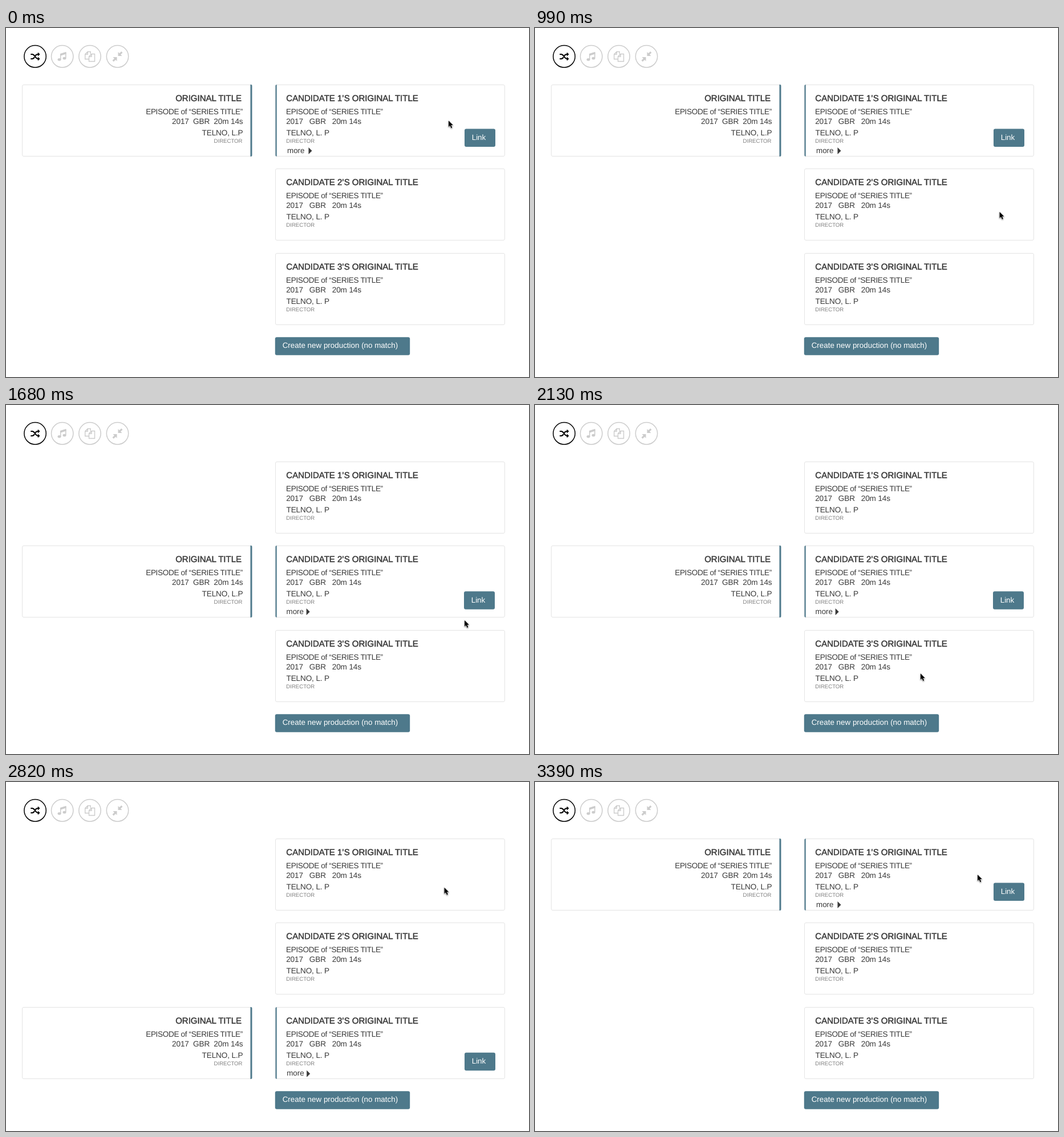
An HTML page for the animation above (3.45 s loop, 917 by 611 pixels).

```html
<!DOCTYPE html>
<html lang="en">
<head>
<meta charset="utf-8">
<title>Candidate matching</title>
<style>
  html, body { margin: 0; width: 100%; height: 100%; overflow: hidden; background: #fff; }
  svg { display: block; width: 917px; height: 611px; }
  text { font: 13.6px "Liberation Sans", Arial, sans-serif; letter-spacing: -.14px; fill: #3a3a3a; white-space: pre; text-rendering: geometricPrecision; }
  .title { font-size: 15px; letter-spacing: 0; stroke: #3a3a3a; stroke-width: .5px; }
  .episode { letter-spacing: -.36px; }
  .role { font-size: 9.6px; letter-spacing: 0; fill: #808080; }
  .label { font-size: 13.4px; letter-spacing: 0; }
  .action { fill: #fff; }
  .end text { text-anchor: end; }
  .box { fill: #fff; stroke: #e4e4e4; }
  .accent { fill: #4e798b; }
  .ring { fill: none; stroke-width: 1.5; }
  .line { fill: none; stroke: currentColor; }
  #cursor path { stroke: #fff; paint-order: stroke; filter: drop-shadow(0 1px 1px rgba(0, 0, 0, .5)); }
</style>
</head>
<body>
<svg viewBox="0 0 917 611">
  <g id="tools">
    <g color="#000">
      <path class="line" stroke-width="2.2" d="M43.300 46h2.500c5 0 5.500 8 10.500 8h.5M43.300 54h2.500c2 0 3.200-1.300 4.200-3M51.500 48.600c1-1.600 2.200-2.600 4.500-2.600h.8"/>
      <path fill="currentColor" d="M55.800 42.500l3.800 3.500-3.800 3.500zM55.800 50.500l3.800 3.500-3.800 3.500z"/>
    </g>
    <g color="#ccc" fill="currentColor">
      <path d="M95 45l10.500-3.200v3.800L95 48.800z"/>
      <path class="line" stroke-width="1.500" d="M95.700 46v9M104.800 43v9.500"/>
      <ellipse cx="93.500" cy="55.300" rx="3" ry="2.300"/>
      <ellipse cx="102.500" cy="53" rx="3" ry="2.300"/>
    </g>
    <g color="#ccc">
      <path class="line" stroke-width="1.400" d="M145.500 54.500h-6.800v-8.500l4.500-4.500h5v4M143.200 41.500v4.500h-4.500M145.500 50l4.500-4.500h5.500v13h-10zM150 45.500v4.500h-4.500"/>
    </g>
    <g color="#ccc" fill="currentColor">
      <path d="M196.500 49v-7l2.300 2.300 3.400-3.400 2.300 2.300-3.400 3.400 2.400 2.400zM194.500 51v7l-2.300-2.300-3.400 3.400-2.300-2.300 3.400-3.400-2.400-2.400z"/>
    </g>
  </g>

  <g id="cards"></g>

  <g id="current" class="end">
    <rect class="box" x="28.500" y="99.500" width="402" height="125" rx="2.500"/>
    <path class="accent" d="M428.500 99h1a2 2 0 0 1 2 2v122a2 2 0 0 1-2 2h-1z"/>
    <text class="title" x="413" y="128.400">ORIGINAL TITLE</text>
    <text class="episode" x="415" y="150.900">EPISODE of “SERIES TITLE”</text>
    <text x="415.500" y="168.400">2017  GBR  20m 14s</text>
    <text x="415.500" y="187.600">TELNO, L.P</text>
    <text class="role" x="414.500" y="201.400">DIRECTOR</text>
  </g>

  <rect class="accent" x="471.800" y="541.200" width="236.400" height="31.600" rx="3"/>
  <text class="label action" x="484.700" y="560.300">Create new production (no match)</text>

  <g id="cursor">
    <path d="M2 .2V11L4.500 8.800 6.500 13.200 8.300 12.400 6.400 8.100H9.800Z"/>
  </g>
</svg>
<script>
const LOOP = 3450;
const SLOTS = [0, 147, 295];
const $ = id => document.getElementById(id);

$('tools').insertAdjacentHTML('beforeend', [51.1, 98.7, 147, 195.5].map((x, i) =>
  `<circle class="ring" cx="${x}" cy="49.800" r="19.2" stroke="${i ? '#ccc' : '#000'}"/>`).join(''));

// Small per-card offsets of the hover controls
const hoverParts = [
  { link: [804, 176.6], more: [493, 218.5], arrow: 530.5 },
  { link: [803, 179.3], more: [491.5, 218.5], arrow: 526.7 },
  { link: [804, 178.8], more: [492.2, 219.2], arrow: 527.2 }
];

function cardMarkup(slot, i) {
  const { link: [lx, ly], more: [mx, my], arrow } = hoverParts[i];
  return `<g transform="translate(0 ${slot})">
    <rect class="box" x="472.500" y="99.500" width="402" height="125" rx="2.500"/>
    <text class="title" x="491.300" y="128.400">CANDIDATE ${i + 1}’S ORIGINAL TITLE</text>
    <text class="episode" x="491" y="150.900">EPISODE of “SERIES TITLE”</text>
    <text x="491.200" y="168.400">2017   GBR   20m 14s</text>
    <text x="491.500" y="188.300">TELNO, L. P</text>
    <text class="role" x="491.300" y="201.400">DIRECTOR</text>
    <g class="hover">
      <path class="accent" d="M474.700 99.300h-.5a1.700 1.700 0 0 0-1.700 1.700v122a1.700 1.700 0 0 0 1.700 1.700h.5z"/>
      <text class="label" x="${mx}" y="${my}">more</text>
      <path d="M${arrow} ${my - 9.5}l6 6-6 6z" fill="#3a3a3a"/>
      <rect class="accent" x="${lx}" y="${ly}" width="54" height="31.500" rx="3"/>
      <text class="label action" x="${lx + 12.7}" y="${ly + 19.2}">Link</text>
    </g>
  </g>`;
}
$('cards').innerHTML = SLOTS.map(cardMarkup).join('');
const hovers = document.querySelectorAll('.hover');

const easeInOut = x => x < .5 ? 2 * x * x : 1 - 2 * (1 - x) ** 2;

// Each move: start time, duration, destination
const cursorMoves = [
  [15, 1430, [822.3, 362]],
  [1500, 700, [671, 472]],
  [2400, 520, [774, 162]]
];
// Each slide: start time, duration, slot that becomes active
const slides = [
  [1493, 180, 1],
  [2243, 180, 2],
  [2943, 450, 0]
];

function follow(moves, start, t) {
  return moves.reduce((from, [begin, duration, to]) => {
    const p = easeInOut(Math.min(1, Math.max(0, (t - begin) / duration)));
    return from.map((v, k) => v + (to[k] - v) * p);
  }, start);
}

function render(t) {
  const active = slides.reduce((slot, [begin, , next]) => t >= begin ? next : slot, 0);
  hovers.forEach((g, i) => g.style.display = i === active ? '' : 'none');

  const [offset] = follow(slides.map(([b, d, s]) => [b, d, [SLOTS[s]]]), [0], t);
  $('current').setAttribute('transform', `translate(0 ${offset})`);

  $('cursor').setAttribute('transform', `translate(${follow(cursorMoves, [774, 162], t)})`);
}

const startTime = performance.now();
function tick() {
  render((performance.now() - startTime) % LOOP);
  requestAnimationFrame(tick);
}
tick();
</script>
</body>
</html>
```
